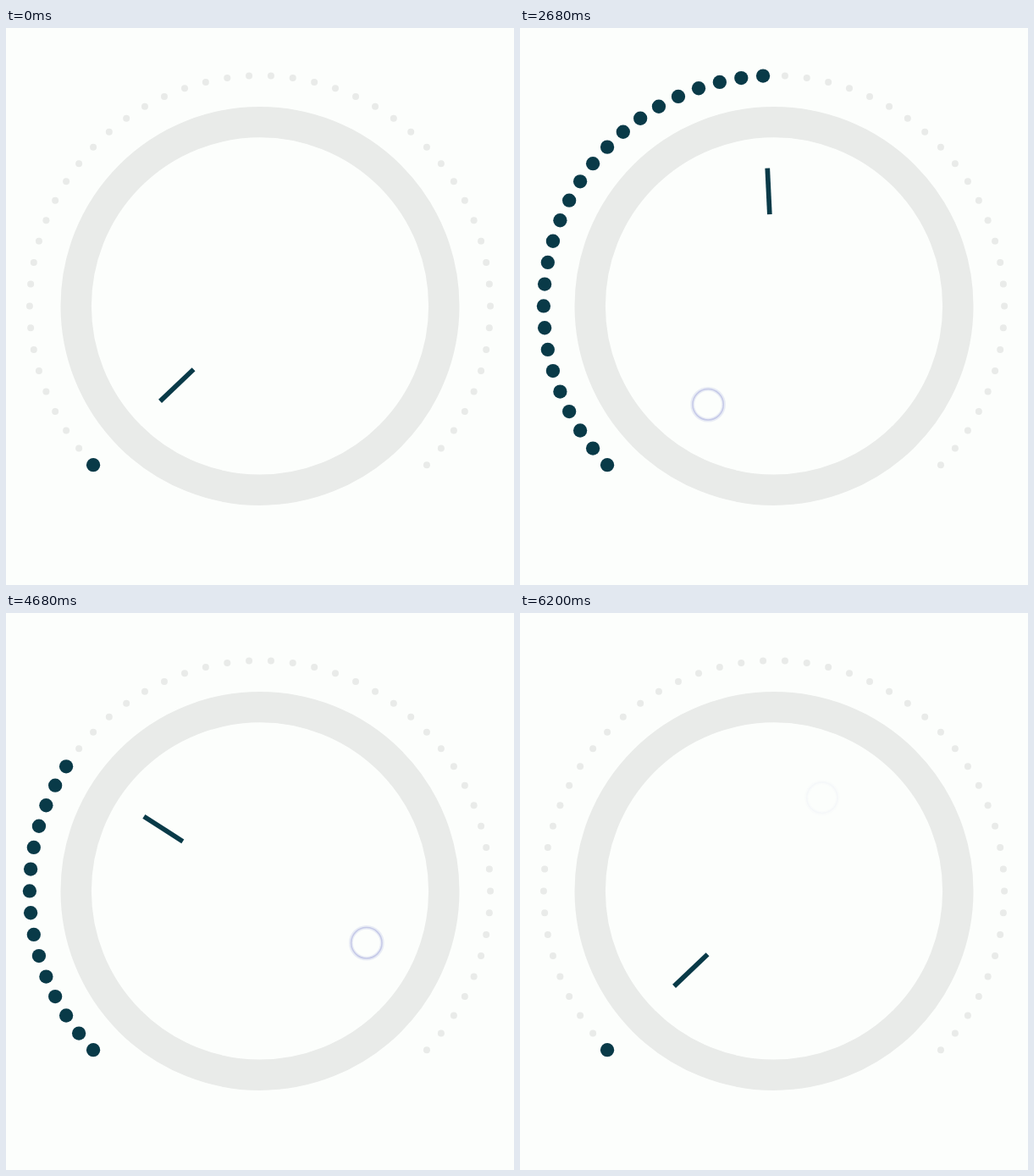
Write an HTML page that moves like this. It is 600 px wide and 658 px high and loops after 6.68 s.

```html
<!DOCTYPE html>
<html lang="en">
<head>
<meta charset="utf-8">
<title>Rotary knob</title>
<style>
  html, body { margin: 0; width: 100%; height: 100%; overflow: hidden; background: #fcfefc; }
  svg { display: block; width: 100%; height: 100%; }
</style>
</head>
<body>
<svg viewBox="0 0 600 658" fill="none">
  <g transform="translate(300 328.4)">
    <circle r="217.3" stroke="#e9ebe9" stroke-width="36.4"/>
    <g id="dots"></g>
    <line id="hand" x1="-163" x2="-108.4" stroke="#093a48" stroke-width="5.7"/>
    <g id="touch" stroke="#c0c4e6">
      <circle r="18.4" stroke-width="4.8" opacity=".33"/>
      <circle r="18.2" stroke-width="1.5" opacity=".85"/>
    </g>
  </g>
</svg>
<script>
const LOOP = 6680, TICK = 40, FREEZE = 6200;
const COUNT = 50, STEP = 360 / 66, FIRST = -8 * STEP, RADIUS = 272.1;
const $ = id => document.getElementById(id);
const clamp = x => Math.max(0, Math.min(1, x));
const rad = deg => deg * Math.PI / 180;

// Turning points of the dial: [ms, index of the last lit dot]
const dial = [
  [920, 0], [1520, 13], [2000, 13], [2760, 24],
  [3080, 24], [4120, 4], [4980, 18], [5760, 0]
];

// Drags around the knob, path points as [ms, degrees, distance from centre]
const drags = [
  { out: 1560, fade: 200, path: [[920, 15, 172], [1520, 86.4, 160]] },
  { out: 2680, fade: 240, path: [[2000, 47, 153], [2680, 123.8, 140]] },
  { out: 5880, fade: 364, path: [
    [3120, 80, 134], [3880, 19, 127], [4200, -28, 150], [4680, 26, 140],
    [4920, 55, 190], [5560, -25.4, 134], [5880, -62.7, 124]
  ] }
];

const slope = (a, b, k) => (b[k] - a[k]) / (b[0] - a[0]);

// Flat at turning points, so nothing overshoots
function tangent(keys, i, k) {
  if (!i || i === keys.length - 1) return 0;
  const a = slope(keys[i - 1], keys[i], k), b = slope(keys[i], keys[i + 1], k);
  return a * b <= 0 ? 0 : 2 * a * b / (a + b);
}

function sample(keys, t, k) {
  const next = keys.findIndex(key => key[0] > t);
  if (next === 0) return keys[0][k];
  if (next < 0) return keys[keys.length - 1][k];
  const i = next - 1, a = keys[i], b = keys[next];
  const span = b[0] - a[0], u = (t - a[0]) / span;
  return a[k] + (b[k] - a[k]) * u * u * (3 - 2 * u)
    + span * u * (1 - u) * ((1 - u) * tangent(keys, i, k) - u * tangent(keys, next, k));
}

const dots = Array.from({ length: COUNT }, (_, i) => {
  const angle = rad(FIRST + i * STEP);
  const dot = document.createElementNS("http://www.w3.org/2000/svg", "circle");
  dot.setAttribute("cx", -RADIUS * Math.cos(angle));
  dot.setAttribute("cy", -RADIUS * Math.sin(angle));
  return $("dots").appendChild(dot);
});

function drawDial(t) {
  const value = Math.round(sample(dial, t, 1));
  dots.forEach((dot, i) => {
    dot.setAttribute("r", i <= value ? 8.15 : 4);
    dot.setAttribute("fill", i <= value ? "#093a48" : "#e9ebe9");
  });
  $("hand").setAttribute("transform", `rotate(${FIRST + value * STEP})`);
}

function drawTouch(t) {
  const { path, out, fade } = drags.find(d => t < d.out + d.fade) || drags[2];
  const angle = rad(sample(path, t, 1)), dist = sample(path, t, 2);
  const shown = clamp((t - path[0][0] + TICK) / 80) * clamp(1 - (t - out) / fade);
  $("touch").setAttribute("transform", `translate(${dist * Math.cos(angle)} ${dist * Math.sin(angle)})`);
  $("touch").setAttribute("opacity", shown);
}

const start = performance.now();
function frame() {
  const time = (performance.now() - start) % LOOP;
  const t = Math.min(FREEZE, Math.floor(time / TICK) * TICK);
  drawDial(t);
  drawTouch(t);
  requestAnimationFrame(frame);
}
frame();
</script>
</body>
</html>
```
